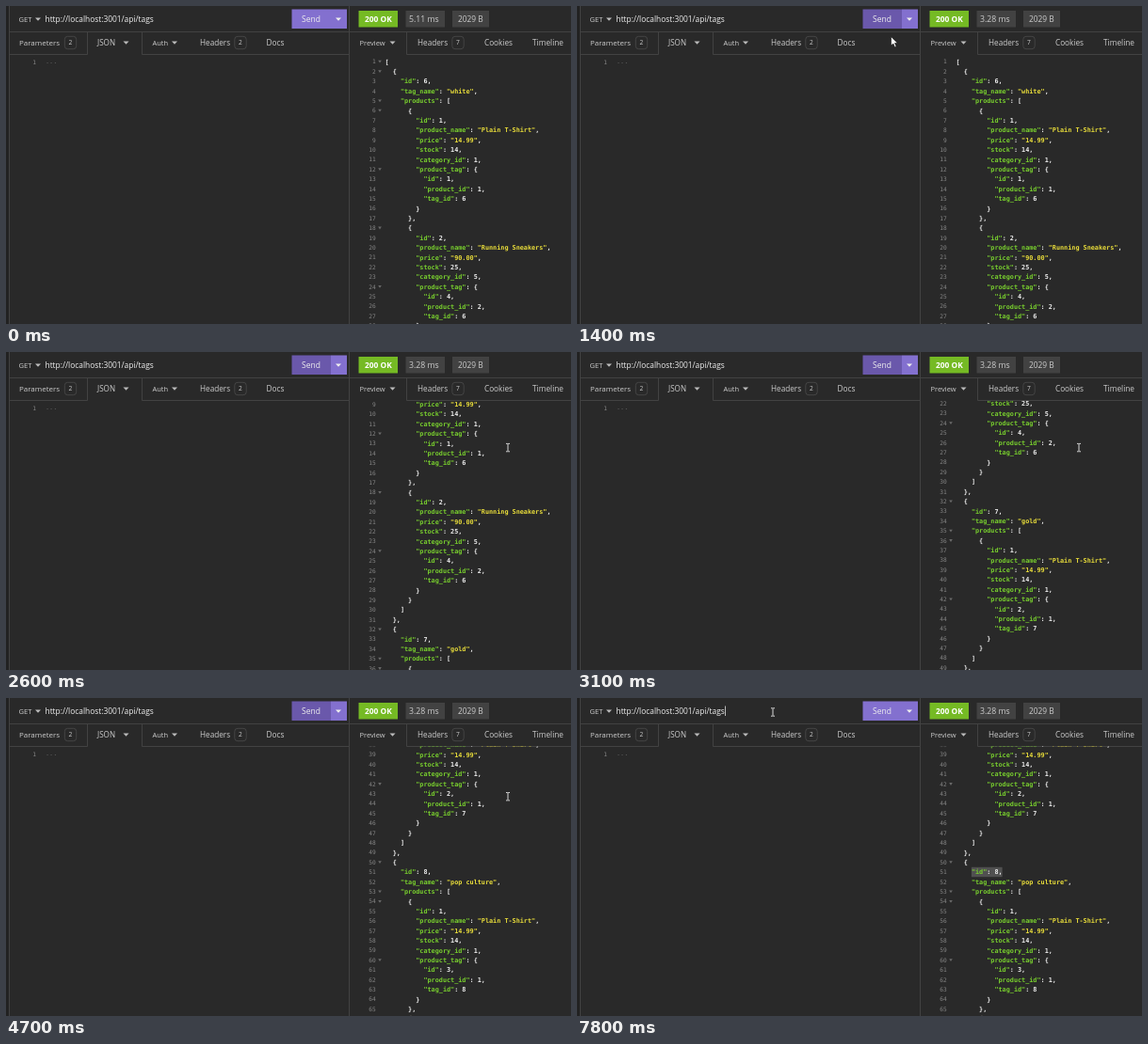
An HTML page that plays this animation: 600x338 px, repeating every 8000 ms.

```html
<!DOCTYPE html>
<html lang="en">
<head>
<meta charset="utf-8">
<style>
html, body { margin: 0; width: 100%; height: 100%; overflow: hidden; background: #292929; }
svg { display: block; width: 600px; height: 338px; }
text { font-family: "Open Sans", "Noto Sans", sans-serif; fill: #ccc; white-space: pre; }
.code text { font: bold 6.8px "DejaVu Sans Mono", monospace; fill: #eee; }
.code .num { font-weight: normal; font-size: 6.2px; fill: #858585; text-anchor: end; }
.code .key { fill: #78ce2e; }
.code .str { fill: #e8dc3a; }
.line { stroke: #424242; fill: none; }
</style>
</head>
<body>
<svg viewBox="0 0 600 338">
  <defs><clipPath id="view"><path d="M365 51.5H600V338H365z"/></clipPath></defs>
  <path fill="#222" d="M0 0H3V338H0z"/>
  <path class="line" d="M3.5 0V338M364.5 0V338M4 27.5H600M4 51.5H86.5V27.5M144.5 27.5V51.5H364M425.5 27.5V51.5H600"/>
  <g id="ui"></g>
  <g class="code">
    <text class="num" x="32" y="61.7">1</text>
    <text x="42" y="61" style="fill:#666;font-weight:normal">...</text>
    <g clip-path="url(#view)"><g id="json"></g></g>
  </g>
  <path id="caret" d="M157.5 8.5V19" stroke="#ddd" stroke-width=".8"/>
  <path id="arrow" d="M0 0V9.6L2.3 7.6L4 11.2L5.6 10.4L4 7H7z" fill="#fff" stroke="#111" stroke-width=".6"/>
  <path id="beam" d="M-2 -4.2H-.6L0 -3.7L.6 -4.2H2M0 -3.7V3.7M-2 4.2H-.6L0 3.7L.6 4.2H2" fill="none" stroke="#eee" stroke-width=".9"/>
</svg>
<script>
const LOOP = 8000, PITCH = 10.4, CHAR = 4.094, CODE_X = 402.5, CODE_Y = 61.6;
const $ = id => document.getElementById(id);

// Interface
const label = (x, y, size, str, extra = '') =>
  `<text x="${x}" y="${y}" font-size="${size}" ${extra}>${str}</text>`;
const box = (x, y, w, h, fill, extra = '') =>
  `<rect x="${x}" y="${y}" width="${w}" height="${h}" fill="${fill}" ${extra}/>`;
const drop = (x, y, fill = '#bbb') =>
  `<path d="M${x - 3} ${y - 1.6}h6l-3 3.4z" fill="${fill}"/>`;
const badge = (x, n) =>
  box(x - 6.2, 32.3, 12.4, 13.4, 'none', 'rx="3.2" stroke="#4c4c4c" stroke-width=".8"') +
  label(x, 41.4, 6.6, n, 'text-anchor="middle"');

$('ui').innerHTML =
  label(13.5, 16.8, 7.5, 'GET') + drop(34, 14) +
  label(41.5, 17, 8.38, 'http://localhost:3001/api/tags', 'style="fill:#eee"') +
  box(303.5, 3.5, 41.5, 20.5, '#8370cf', 'id="send"') + box(345, 3.5, 17, 20.5, '#8370cf') +
  label(314, 17.2, 8.5, 'Send', 'style="fill:#eee"') + drop(353, 14, '#eee') +
  box(374.5, 5, 41.5, 17.5, '#75ba24') + box(424.5, 5, 41.5, 17.5, '#424242') +
  box(474, 5, 39, 17.5, '#424242') +
  label(381, 17, 8.4, '200 OK', 'font-weight="bold" style="fill:#fff"') +
  label(428, 17, 8.7, '', 'id="took"') + label(480, 17, 8.4, '2029 B') +
  label(14, 42.3, 8, 'Parameters') + badge(68.5, 2) +
  label(97, 42, 8.1, 'JSON') + drop(127.5, 39) +
  label(155.5, 42, 7.5, 'Auth') + drop(179, 39) +
  label(206, 42.3, 8.2, 'Headers') + badge(249, 2) +
  label(276.5, 42.3, 8.3, 'Docs') +
  label(375.5, 42, 7.5, 'Preview') + drop(410.5, 39) +
  label(437, 42.3, 8.2, 'Headers') + badge(480, 7) +
  label(508, 42.3, 8.2, 'Cookies') + label(559, 42.3, 8.3, 'Timeline');

// Response body
const goods = {
  1: { product_name: 'Plain T-Shirt', price: '14.99', stock: 14, category_id: 1 },
  2: { product_name: 'Running Sneakers', price: '90.00', stock: 25, category_id: 5 },
};
const tag = (id, tag_name, ...links) => ({
  id, tag_name,
  products: links.map(([item, link]) => ({
    id: item, ...goods[item],
    product_tag: { id: link, product_id: item, tag_id: id },
  })),
});
const data = [
  tag(6, 'white', [1, 1], [2, 4]),
  tag(7, 'gold', [1, 2]),
  tag(8, 'pop culture', [1, 3], [2, 5]),
];

const span = (cls, str) => `<tspan class="${cls}">${str}</tspan>`;
const row = (line, i) => {
  const str = line.trimStart(), y = CODE_Y + i * PITCH;
  const x = CODE_X + (line.length - str.length) * CHAR;
  const colored = str.replace(/"[^"]*"(:?)/g, (m, colon) =>
    colon ? span('key', m.slice(0, -1)) + ':' : span('str', m));
  const fold = /[[{]$/.test(str)
    ? `<path class="fold" d="M395.2 ${y - 3.8}h3.6l-1.8 2.8z" fill="#6a6a6a"/>` : '';
  return `<text class="num" x="392.8" y="${y - .3}">${i + 1}</text>${fold}<text x="${x}" y="${y}">${colored}</text>`;
};
$('json').innerHTML = box(0, CODE_Y + 50 * PITCH - 7.7, 0, PITCH, '#505050', 'id="pick"') +
  JSON.stringify(data, null, 2).split('\n').map(row).join('');
const folds = document.querySelectorAll('.fold');

// Motion
const clamp = v => Math.max(0, Math.min(1, v));
const smooth = v => v * v * (3 - 2 * v);
const path = [
  [300, 330, 346], [850, 326, 16], [1150, 326, 16], [1400, 333.5, 32.5], [2050, 533, 101.6],
  [3250, 533, 101.6], [3400, 533, 102.8], [4200, 533, 102.8], [4500, 533, 104.7], [4950, 533, 104.7],
  [5450, 453, 185], [5550, 453, 185], [5950, 418.5, 182], [6650, 418.5, 182], [7400, 208, 15],
];
const pointer = t => {
  const i = path.findIndex(p => p[0] > t);
  if (i < 1) return (i ? path[path.length - 1] : path[0]).slice(1);
  const [t0, x0, y0] = path[i - 1], [t1, x1, y1] = path[i];
  const k = smooth((t - t0) / (t1 - t0));
  return [x0 + (x1 - x0) * k, y0 + (y1 - y0) * k];
};
// Each wheel notch glides the same distance.
const notches = [2250, 2522, 2790, 2970, 3310, 4200, 4400];
const scroll = t => notches.reduce((sum, n) => sum + 56.3 * smooth(clamp((t - n) / 150)), 0);
const show = (id, on) => $(id).style.display = on ? '' : 'none';

function draw(t) {
  const [x, y] = pointer(t), sent = t >= 1000;
  $('took').textContent = sent ? '3.28 ms' : '5.11 ms';
  $('send').setAttribute('fill', t > 800 && t < 5500 ? '#6a58ab' : '#8370cf');
  $('json').setAttribute('transform', `translate(0 ${-scroll(t)})`);
  for (const f of folds) f.style.display = sent && t < 1850 ? 'none' : '';

  // Dragging selects whole characters of line 51, from its end to the left.
  const end = CODE_X + 12 * CHAR;
  const cells = t < 5550 ? 0 : t > 5950 ? 8 : Math.round((end - x) / CHAR);
  const wide = Math.max(0, Math.min(8, cells)) * CHAR;
  $('pick').setAttribute('x', end - wide);
  $('pick').setAttribute('width', wide);

  const isArrow = t < 1600;
  show('arrow', isArrow && t > 300);
  show('beam', !isArrow);
  show('caret', t >= 7500);
  $(isArrow ? 'arrow' : 'beam').setAttribute('transform', `translate(${x} ${y})`);
}

const begin = performance.now();
function tick() {
  draw((performance.now() - begin) % LOOP);
  requestAnimationFrame(tick);
}
tick();
</script>
</body>
</html>
```
